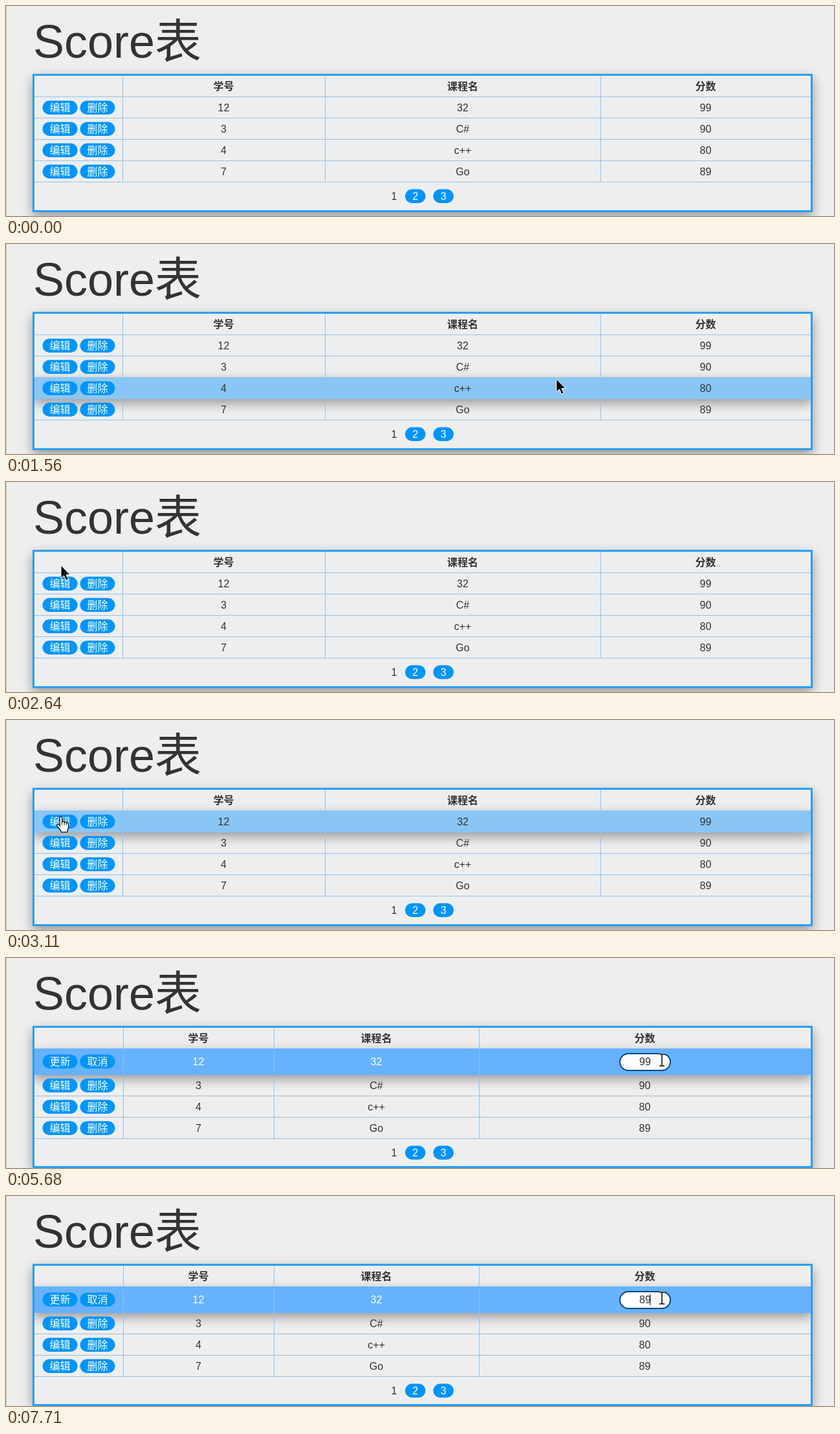
Write an HTML page that moves like this. It is 1280 px wide and 325 px high and loops after 8 s.

```html
<!DOCTYPE html>
<html lang="zh">
<head>
<meta charset="utf-8">
<title>Score</title>
<style>
html, body { margin: 0; width: 100%; height: 100%; overflow: hidden; background: #eee; }
svg { display: block; width: 1280px; height: 325px; }
text { font: 16px "Liberation Sans", Arial, "Noto Sans CJK SC", "Noto Sans CJK", sans-serif; fill: #333; text-anchor: middle; }
.title { font-size: 72px; text-anchor: start; }
.head { font-weight: bold; }
.w { fill: #fff; }
</style>
</head>
<body>
<svg viewBox="0 0 1280 325">
  <defs>
    <filter id="b8" filterUnits="userSpaceOnUse" x="0" y="0" width="1280" height="420"><feGaussianBlur stdDeviation="8"/></filter>
    <filter id="b10" filterUnits="userSpaceOnUse" x="0" y="0" width="1280" height="420"><feGaussianBlur stdDeviation="10"/></filter>
    <filter id="b2" x="-10%" y="-10%" width="120%" height="125%"><feGaussianBlur stdDeviation="2"/></filter>
    <clipPath id="inside"><rect x="41" y="105" width="1206" height="220"/></clipPath>
  </defs>
  <rect width="1280" height="325" fill="#eee"/>
  <rect width="1" height="325" fill="#c8c8c8"/>
  <text class="title" x="42" y="80">Score表</text>
  <g id="view"></g>
  <g id="edit"></g>
  <g id="popup">
    <rect id="popShade" x="948" y="178" width="220" fill="#000" opacity=".3" filter="url(#b2)"/>
    <rect id="popBox" x="948" y="176" width="220" rx="3" fill="#fff" stroke="#ccc"/>
    <text id="item0" x="973" y="211"></text>
    <text id="item1" x="973" y="253"></text>
    <text id="item2" x="973" y="295"></text>
  </g>
  <g id="arrow"><path d="M0 0V20L4.6 15.8 7.8 23.2 11.2 21.7 8 14.5H14Z" fill="#000" stroke="#fff" stroke-width="1"/></g>
  <g id="hand"><path d="M0 1.5C0-.6 3.4-.6 3.4 1.5V8.2C4.4 7 6.8 7.3 7 8.8 8.2 7.8 10.4 8.3 10.5 9.8 11.8 9 13.4 9.8 13.4 11.4V16.5C13.4 19 11.6 20.5 11.6 24H2.2C2.2 21-4.6 15.6-4.6 13 -4.4 10.6-1.6 11.4 0 14Z" fill="#fff" stroke="#000" stroke-width="1.2"/><path d="M3.4 8V13M7 9V13M10.5 10V13" stroke="#000" fill="none"/></g>
  <g id="beam" fill="none"><path d="M-4-9H-1L0-8 1-9H4M0-8V8M-4 9H-1L0 8 1 9H4" stroke="#fff" stroke-width="3"/><path d="M-4-9H-1L0-8 1-9H4M0-8V8M-4 9H-1L0 8 1 9H4" stroke="#111" stroke-width="1.6"/></g>
</svg>
<script>
const $ = id => document.getElementById(id);
const data = [['12', '32', '99'], ['3', 'C#', '90'], ['4', 'c++', '80'], ['7', 'Go', '89']];
const label = (s, x, y, cls = '') => `<text class="${cls}" x="${x}" y="${y + 6}">${s}</text>`;
const pill = (s, x, y, w) =>
  `<rect x="${x}" y="${y - 10.5}" width="${w}" height="21.5" rx="10.75" fill="#0094ff"/>` + label(s, x + w / 2, y, 'w');
const shade = (x, y, w, h) =>
  `<rect x="${x}" y="${y + 8}" width="${w}" height="${h}" opacity=".2" filter="url(#b8)"/>` +
  `<rect x="${x}" y="${y + 6}" width="${w}" height="${h}" opacity=".19" filter="url(#b10)"/>`;

function table(key, cols, tops, bottom, editing) {
  const mids = cols.map((c, i) => (c + (cols[i + 1] || 1244)) / 2);
  const end = tops[4];
  let s = shade(41, 105, 1206, bottom - 105) +
    `<rect x="41" y="105" width="1206" height="${bottom - 105}" fill="#eee"/>`;
  s += '<g clip-path="url(#inside)">';
  for (let r = 0; r < 4; r++)
    s += `<g id="${key}s${r}" opacity="0">${shade(43, tops[r], 1202, tops[r + 1] - tops[r])}</g>`;
  s += '</g>';
  for (const y of tops) s += `<rect x="44" y="${y}" width="1200" height="1" fill="${editing && y > 200 ? '#9dbdd8' : '#90c4f0'}"/>`;
  for (const x of cols) s += `<rect x="${x}" y="108" width="1" height="${end - 108}" fill="#90c4f0"/>`;
  for (let r = 0; r < 4; r++) {
    const fixed = editing && !r;
    s += `<rect id="${key}r${r}" x="43" y="${tops[r]}" width="1202" height="${tops[r + 1] - tops[r] + 1}" fill="${fixed ? '#66b2ff' : '#8ac6f5'}" opacity="${+fixed}"/>`;
  }
  if (editing) for (const x of cols) s += `<rect x="${x}" y="141" width="1" height="40" fill="#86c2fb"/>`;
  s += `<rect x="42.5" y="106.5" width="1203" height="${bottom - 108}" fill="none" stroke="#2a9df5" stroke-width="3"/>`;
  ['学号', '课程名', '分数'].forEach((h, i) => s += label(h, mids[i], 124, 'head'));
  data.forEach((row, r) => {
    const y = (tops[r] + tops[r + 1] + 1) / 2 - (editing && !r ? .5 : 0), now = editing && !r;
    s += pill(now ? '更新' : '编辑', 56.5, y, 54) + pill(now ? '取消' : '删除', 114.5, y, 54);
    row.forEach((v, i) => {
      if (!now || i < 2) s += label(v, mids[i], y, now ? 'w' : '');
    });
  });
  if (editing)
    s += '<rect x="949" y="148" width="78" height="26" rx="13" fill="#fff" stroke="#0d4a7c" stroke-width="2"/>' +
      '<text id="value" x="988" y="166"></text><rect id="caret" y="152" width="1" height="17" fill="#111"/>';
  const p = end + 22;
  return s + label('1', 600, p) + pill('2', 617, p, 31.5) + pill('3', 660.5, p, 31.5);
}
$('view').innerHTML = table('v', [180, 493, 919], [140, 173, 206, 239, 272], 319, false);
$('edit').innerHTML = table('e', [181, 414, 731], [140, 180, 213, 246, 279], 325, true);

// [time, x, y] of the pointer
const path = [[290, 915, 320], [620, 890, 262], [1080, 872, 245], [1170, 868, 238], [1560, 851, 209],
  [1780, 838, 204], [1940, 830, 179], [2020, 830, 179], [2100, 690, 170], [2260, 140, 152], [2489, 140, 152],
  [2490, 105, 138], [2640, 85, 129], [2869, 85, 129], [2950, 84, 145], [3340, 82, 156], [4299, 82, 156],
  [4300, 180, 134], [4430, 757, 130], [4599, 757, 130], [4600, 850, 146], [4800, 926, 160],
  [5130, 1004, 145], [5299, 1004, 145], [5300, 1013, 157], [5530, 1014, 158]];
// [row, enter, leave] of the hovered rows
const hovers = [[3, 600, 1170], [2, 1170, 1780], [1, 1780, 2080], [0, 2080, 2490], [0, 2870, 3810]];
const clamp = v => Math.max(0, Math.min(1, v));
const show = (id, on) => $(id).setAttribute('visibility', on ? 'visible' : 'hidden');
const fade = (id, v) => $(id).setAttribute('opacity', v);

function pointer(t) {
  let i = path.findIndex(k => k[0] > t);
  if (i < 1) return path[i ? path.length - 1 : 0].slice(1);
  const [a, b] = [path[i - 1], path[i]], u = (t - a[0]) / (b[0] - a[0]);
  return [a[1] + (b[1] - a[1]) * u, a[2] + (b[2] - a[2]) * u];
}

function suggest(list, alpha) {
  const h = list.length * 42 + 14;
  $('popBox').setAttribute('height', h);
  $('popShade').setAttribute('height', h);
  for (let i = 0; i < 3; i++) $('item' + i).textContent = list[i] || '';
  fade('popup', alpha);
}

function draw(t) {
  const editing = t >= 3810;
  $('view').style.display = editing ? 'none' : '';
  $('edit').style.display = editing ? '' : 'none';
  const lit = [0, 0, 0, 0];
  for (const [r, a, b] of hovers) lit[r] = Math.max(lit[r], clamp((t - a) / 150) * (1 - clamp((t - b) / 150)));
  lit.forEach((v, r) => { fade('vr' + r, v); fade('vs' + r, v); });
  fade('es0', clamp((t - 4600) / 300));

  const value = t < 6150 ? '99' : t < 6390 ? '9' : t < 7480 ? '' : t < 7710 ? '8' : '89';
  $('value').textContent = value;
  $('caret').setAttribute('x', 988 + value.length * 4 - (value.length > 1 ? .5 : 0));
  show('caret', editing && ((t >= 5530 && t < 5680) || (t >= 6150 && t < 6780) || t >= 7250));
  if (t < 7000) suggest(['99', '90', '98'], t < 6150 ? 0 : Math.min(clamp((t - 6070) / 160), 1 - clamp((t - 6350) / 120)));
  else suggest(['80', '89'], t < 7480 || t >= 7710 ? 0 : clamp((t - 7400) / 160));

  const [x, y] = pointer(t);
  const kind = t < 290 ? '' : t >= 5300 ? 'beam' : t >= 2950 && t < 4300 ? 'hand' : 'arrow';
  for (const k of ['arrow', 'hand', 'beam']) {
    show(k, k === kind);
    $(k).setAttribute('transform', `translate(${x.toFixed(1)} ${y.toFixed(1)})`);
  }
}

const start = performance.now();
function tick() {
  draw((performance.now() - start) % 8000);
  requestAnimationFrame(tick);
}
tick();
</script>
</body>
</html>
```
